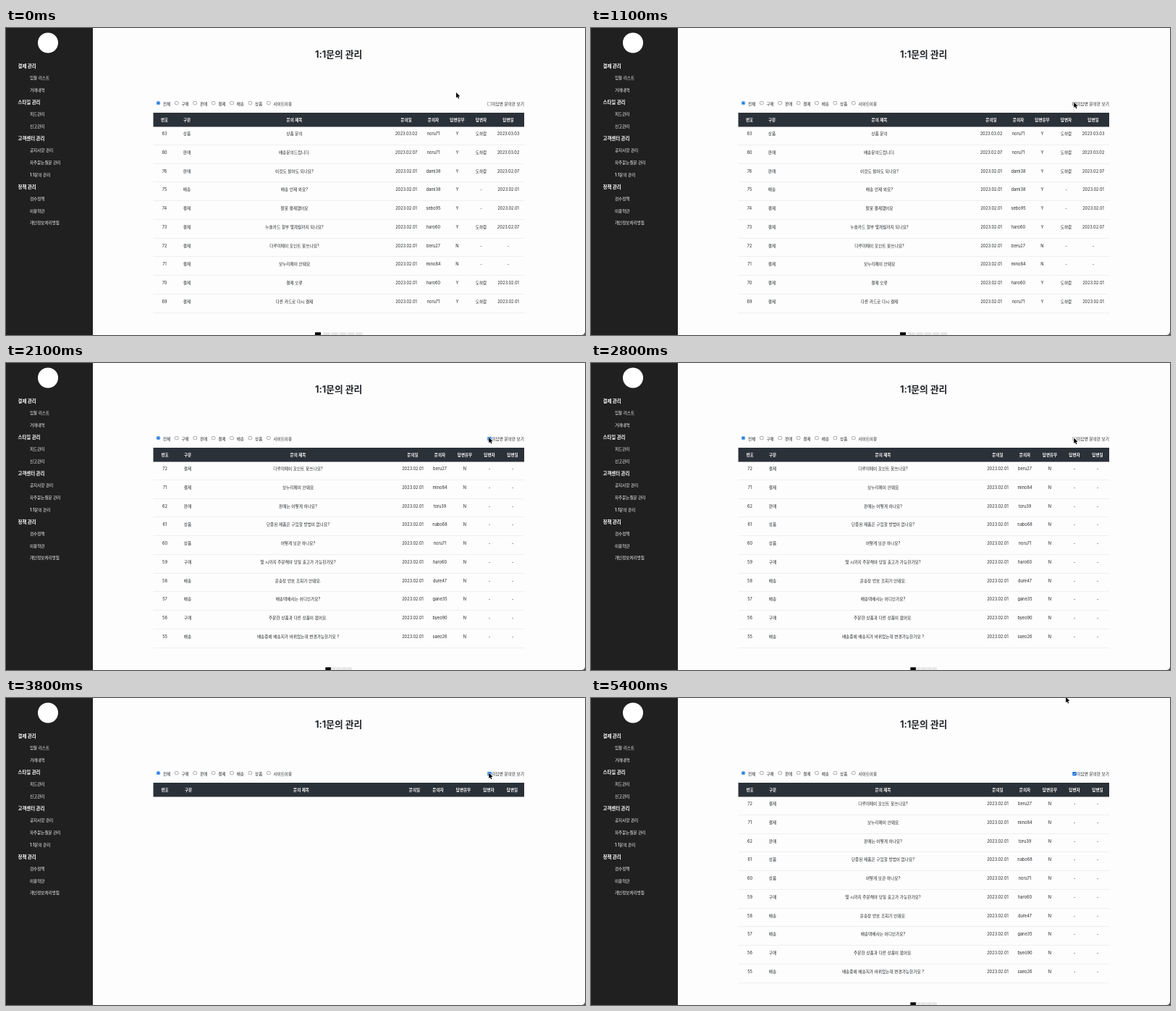
These frames come from a looping animation (800x424 px, 5.6 s). An HTML page with a canvas:

```html
<!DOCTYPE html>
<html lang="ko">
<head>
<meta charset="utf-8">
<title>1:1문의 관리</title>
<style>
html, body { margin: 0; width: 100%; height: 100%; overflow: hidden; background: #fdfdfd; }
canvas { display: block; width: 800px; height: 424px; }
</style>
</head>
<body>
<canvas id="stage" width="800" height="424"></canvas>
<script>
const ctx = document.getElementById('stage').getContext('2d');
const LOOP = 5600, STEP = 100, ROW = 25.75, TOP = 136.5;
const INK = '#212529', BLUE = '#0b6cdc';
const FAMILY = "Inter, 'Noto Sans CJK KR', 'Noto Sans CJK', sans-serif";

const MENU = [
  ['결제 관리', '입찰 리스트', '거래내역'],
  ['스타일 관리', '피드관리', '신고관리'],
  ['고객센터 관리', '공지사항 관리', '자주묻는질문 관리', '1:1문의 관리'],
  ['정책 관리', '검수정책', '이용약관', '개인정보처리방침']
];
const FILTERS = ['전체', '구매', '판매', '결제', '배송', '상품', '사이트이용'];
const HEADS = ['번호', '구분', '문의 제목', '문의일', '문의자', '답변유무', '답변자', '답변일'];

const split = text => text.trim().split('\n').map(line => line.split('|'));

const allRows = split(`
83|상품|상품 문의|2023.03.02|noru71|Y|도하람|2023.03.03
80|판매|배송문의드립니다.|2023.02.07|noru71|Y|도하람|2023.03.02
76|판매|이것도 팔아도 되나요?|2023.02.01|dami38|Y|도하람|2023.02.07
75|배송|배송 언제 와요?|2023.02.01|dami38|Y|-|2023.02.01
74|결제|잘못 결제했어요|2023.02.01|sebo95|Y|-|2023.02.01
73|결제|누솔카드 할부 몇개월까지 되나요?|2023.02.01|haro60|Y|도하람|2023.02.07
72|결제|다루미페이 포인트 못쓰나요?|2023.02.01|beru27|N|-|-
71|결제|보누리페이 안돼요|2023.02.01|mino84|N|-|-
70|결제|결제 오류|2023.02.01|haro60|Y|도하람|2023.02.01
69|결제|다른 카드로 다시 결제|2023.02.01|noru71|Y|도하람|2023.02.01`);

const openRows = split(`
72|결제|다루미페이 포인트 못쓰나요?|beru27
71|결제|보누리페이 안돼요|mino84
62|판매|판매는 어떻게 하나요?|toru39
61|상품|단종된 제품은 구입할 방법이 없나요?|nabo68
60|상품|어떻게 보관 하나요?|noru71
59|구매|몇 시까지 주문해야 당일 출고가 가능한가요?|haro60
58|배송|운송장 번호 조회가 안돼요.|dure47
57|배송|배송택배사는 어디인가요?|gane35
56|구매|주문한 상품과 다른 상품이 왔어요.|byeo90
55|배송|배송중에 배송지가 바뀌었는데 변경가능한가요 ?|saeo26`)
  .map(([no, kind, title, user]) => [no, kind, title, '2023.02.01', user, 'N', '-', '-']);

const TABLES = {
  all: { rows: allRows, cols: [219, 250, 398.5, 553, 590.5, 623.5, 656.5, 694], pager: { x: 427, n: 6, pitch: 11.2, w: 9.4 } },
  open: { rows: openRows, cols: [219.5, 251, 403.5, 562, 599.5, 634, 668, 700], pager: { x: 441.3, n: 5, pitch: 7.5, w: 6.7 } },
  empty: { rows: [], cols: [219.5, 252, 408, 564.5, 597, 632, 667, 699.5] }
};

// Table and checkbox state from each moment on
const STATES = [
  [0, 'all', 'off'], [1100, 'all', 'pressed'], [1200, 'all', 'on'], [1300, 'open', 'on'],
  [2700, 'open', 'pressed'], [2800, 'open', 'off'], [2900, 'all', 'off'],
  [3800, 'empty', 'on'], [3900, 'open', 'on']
];

// Pointer tip: time, x, y
const PATH = [
  [0, 622, 89], [100, 624, 89.5], [200, 632, 91.5], [300, 645, 95], [400, 657, 99], [500, 664, 101.3],
  [600, 667, 102], [700, 667.7, 103.5], [800, 667.2, 102.5],
  [2100, 667.2, 102.8], [2200, 667.2, 103.1], [2300, 667.2, 103.4],
  [5200, 667, 88], [5300, 662, 40], [5400, 656, -1.3]
];

const latest = (list, t) => list.filter(item => item[0] <= t).pop();

function rect(x, y, w, h, color) {
  ctx.fillStyle = color;
  ctx.fillRect(x, y, w, h);
}

function circle(x, y, r, color) {
  ctx.fillStyle = color;
  ctx.beginPath();
  ctx.arc(x, y, r, 0, Math.PI * 2);
  ctx.fill();
}

// Drawn large and scaled down so small type keeps fractional advances
function text(str, x, cy, { size = 5.65, weight = 400, color = INK, align = 'left' } = {}) {
  ctx.save();
  ctx.translate(x, cy + size * 0.37);
  ctx.scale(0.1, 0.1);
  ctx.font = `${weight} ${size * 10}px ${FAMILY}`;
  ctx.textAlign = align;
  ctx.fillStyle = color;
  ctx.fillText(str, 0, 0);
  ctx.restore();
}

function sidebar() {
  rect(0, 0, 120, 424, '#202020');
  circle(58, 20.5, 14, '#fff');
  let y = 52.3;
  for (const [head, ...items] of MENU) {
    text(head, 16.5, y, { size: 6.4, weight: 700, color: '#fff' });
    for (const item of items) text(item, 33, y += 16.7, { size: 5.57, weight: 500, color: '#fff' });
    y += 16.7;
  }
}

function filters() {
  FILTERS.forEach((label, i) => {
    const x = 210.4 + i * 25.4, y = 103.6;
    circle(x, y, 2.7, i ? '#767676' : BLUE);
    circle(x, y, i ? 2.2 : 2.1, '#fff');
    if (!i) circle(x, y, 1.6, BLUE);
    text(label, x + 6.7, 104.6, { size: 5.57 });
  });
}

function checkbox(state) {
  const x = 665.3, y = 101.9, s = 5.4;
  const edge = { off: '#767676', pressed: '#4f4f4f', on: BLUE }[state];
  ctx.fillStyle = edge;
  ctx.beginPath();
  ctx.roundRect(x, y, s, s, 0.9);
  ctx.fill();
  if (state === 'on') {
    ctx.strokeStyle = '#fff';
    ctx.lineWidth = 0.85;
    ctx.beginPath();
    ctx.moveTo(x + 1.1, y + 2.8);
    ctx.lineTo(x + 2.2, y + 3.9);
    ctx.lineTo(x + 4.3, y + 1.4);
    ctx.stroke();
  } else {
    rect(x + 0.5, y + 0.5, s - 1, s - 1, state === 'off' ? '#fff' : '#ddd');
  }
  text('미답변 문의만 보기', 716, 105.2, { align: 'right' });
}

function table({ rows, cols, pager }) {
  rect(203.5, 117, 512.5, TOP - 117, '#2b3138');
  HEADS.forEach((head, i) =>
    text(head, cols[i], 126.6, { size: 5.57, weight: 700, color: '#fff', align: 'center' }));
  rows.forEach((row, r) => {
    const y = TOP + r * ROW;
    row.forEach((cell, i) => text(cell, cols[i], y + 9.6, { align: 'center' }));
    rect(203.5, Math.floor(y + ROW) - 1, 512.5, 1, '#efeff0');
  });
  if (!pager) return;
  for (let i = 0; i < pager.n; i++) {
    const x = pager.x + i * pager.pitch;
    rect(x, 420.3, i ? pager.w : 8, 4, i ? '#e6e6e6' : '#000');
  }
}

function corner() {
  ctx.fillStyle = '#4a4a4a';
  ctx.beginPath();
  ctx.moveTo(800, 419.5);
  ctx.quadraticCurveTo(799.5, 423.5, 795.5, 424);
  ctx.lineTo(800, 424);
  ctx.fill();
}

function pointer(x, y) {
  const shape = [[0, 0], [0, 7.6], [1.8, 6], [3, 8.8], [4.2, 8.3], [3, 5.5], [5.4, 5.4]];
  ctx.beginPath();
  shape.forEach(([dx, dy]) => ctx.lineTo(x + dx, y + dy));
  ctx.closePath();
  ctx.lineJoin = 'round';
  ctx.strokeStyle = '#fff';
  ctx.lineWidth = 1.1;
  ctx.stroke();
  ctx.fillStyle = '#000';
  ctx.fill();
}

function draw(now) {
  const t = Math.floor((now % LOOP) / STEP) * STEP;
  const [, view, check] = latest(STATES, t);
  const [, x, y] = latest(PATH, t);
  rect(0, 0, 800, 424, '#fdfdfd');
  sidebar();
  text('1:1문의 관리', 459.6, 36, { size: 12.8, weight: 700, align: 'center' });
  filters();
  checkbox(check);
  table(TABLES[view]);
  corner();
  pointer(x, y);
}

const start = performance.now();
function tick() {
  draw(performance.now() - start);
  requestAnimationFrame(tick);
}
tick();
</script>
</body>
</html>
```
